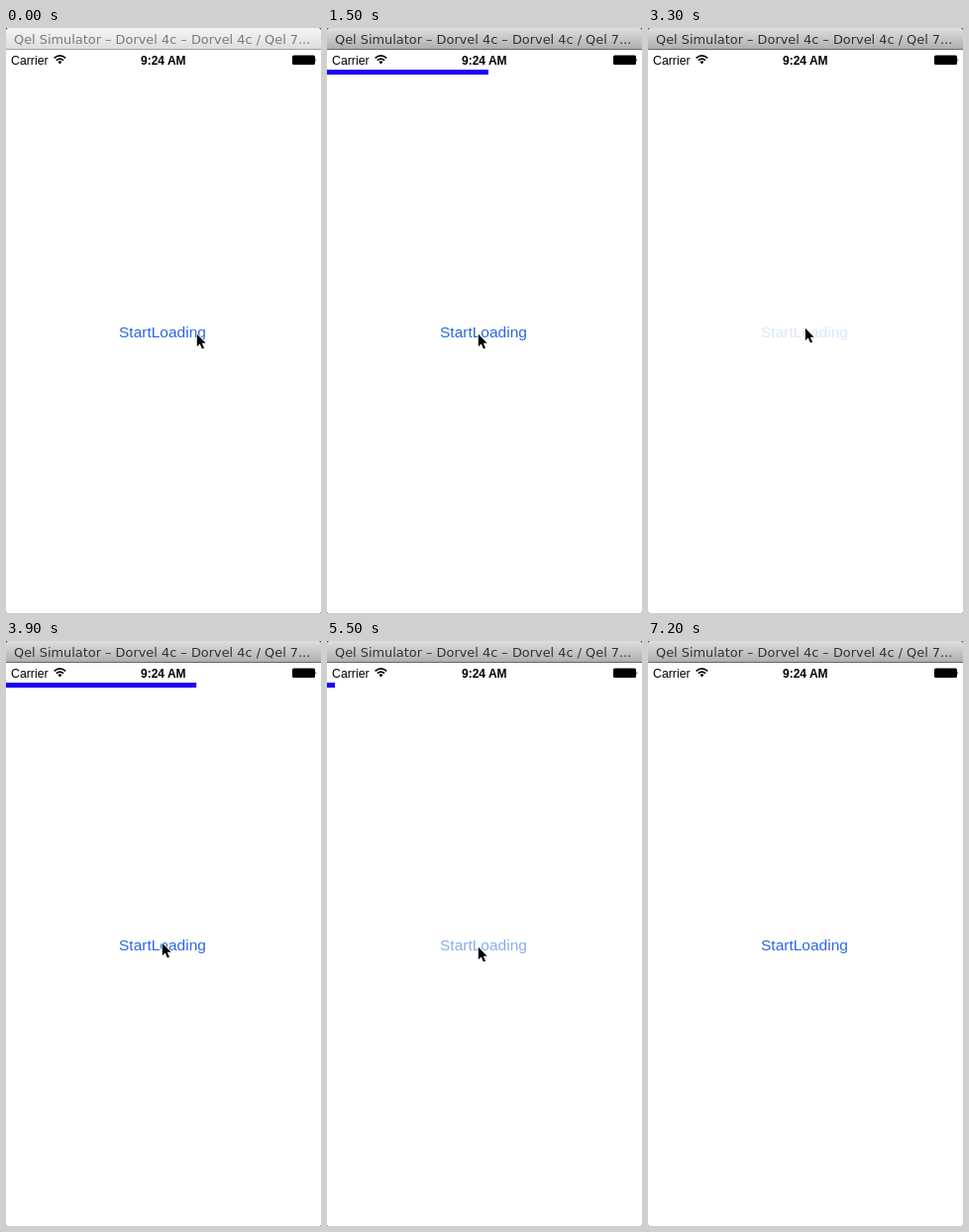
These frames come from a looping animation (318x590 px, 7.6 s). An HTML page:

```html
<!DOCTYPE html>
<html lang="en">
<head>
<meta charset="utf-8">
<title>Loading bar</title>
<style>
  html, body { margin: 0; width: 318px; height: 590px; overflow: hidden; background: #444; }
  svg { display: block; }
  text { font-family: "Liberation Sans", Arial, sans-serif; }
  #title { font-family: "DejaVu Sans", sans-serif; }
</style>
</head>
<body>
<svg width="318" height="590" viewBox="0 0 318 590">
  <defs>
    <linearGradient id="active" x2="0" y2="1">
      <stop stop-color="#dedede"/><stop offset="1" stop-color="#adadad"/>
    </linearGradient>
    <linearGradient id="inactive" x2="0" y2="1">
      <stop stop-color="#f5f5f5"/><stop offset="1" stop-color="#dcdcdc"/>
    </linearGradient>
  </defs>

  <path d="M0 22H318V589L317 590H1L0 589Z" fill="#fff"/>
  <path id="titleBar" d="M0 22V3Q0 0 3 0H315Q318 0 318 3V22Z"/>
  <path id="titleEdge" d="M0 21.5H318"/>
  <text id="title" x="8" y="16" font-size="12.9">Qel Simulator – Dorvel 4c – Dorvel 4c / Qel 7...</text>

  <text x="5" y="36.5" font-size="12.3">Carrier</text>
  <g fill="none" stroke="#000" stroke-width="1.7">
    <path d="M48.6 30.4Q54.4 25.4 60.2 30.4M50.8 32.7Q54.4 29.6 58 32.7"/>
    <path d="M52.4 34L54.4 36.4L56.4 34Q54.4 32.6 52.4 34Z" fill="#000" stroke="none"/>
  </g>
  <text x="136" y="36.5" font-size="12" font-weight="bold">9:24 AM</text>
  <rect x="289" y="27.5" width="23" height="9.5" rx="1.5"/>
  <path d="M312.6 30.5Q314.2 32.2 312.6 34Z"/>

  <rect id="progress" y="42" height="5" fill="#1f00f5"/>
  <text id="button" x="114" y="311.5" font-size="15.5" fill="#2a68e4">StartLoading</text>

  <g id="cursor">
    <path d="M1 1V14L4 11.2L6.2 16.3L8.3 15.4L6.1 10.5H10Z" opacity=".18"/>
    <path d="M.8 .8V13.2L3.7 10.5L5.9 15.6L8 14.7L5.8 9.8H9.6Z" stroke="#fff" stroke-width="1.6" paint-order="stroke"/>
  </g>
</svg>
<script>
const LOOP = 7600, STEP = 100, WIDTH = 318;
const PRESS_TIME = 130, FADE_TIME = 200, PRESSED_OPACITY = 0.16;
const EXIT = 6400, CURSOR_GONE = 6700;

const clicks = [
  { release: 880, load: 1220 },
  { release: 3330, load: 1000 },
  { release: 5407, load: 985 }
];

const el = id => document.getElementById(id);
const clamp = v => Math.min(1, Math.max(0, v));
const phase = (t, from, to) => clamp((t - from) / (to - from));
const easeInOut = u => u * u * (3 - 2 * u);
const glide = (t, from, to) => easeInOut(phase(t, from, to));
const bump = (t, from, to) => Math.sin(Math.PI * phase(t, from, to)) ** 2;

// The pointer rests on the button, dips below it after the second and third click, then leaves.
function pointerAt(t) {
  const arrive = 1 - glide(t, 0, 700);
  const sway = bump(t, 1500, 5100);
  const dip = bump(t, 3900, 4900);
  const sink = glide(t, 5900, EXIT);
  const exit = glide(t, EXIT, EXIT + 200);
  return [
    152 + 40 * arrive + 6 * sway + 23 * dip + 16 * sink + 115 * exit,
    308 - 6 * sway + 94 * dip + 96 * sink - 276 * exit
  ];
}

function buttonOpacity(t) {
  const click = clicks.filter(c => t >= c.release - PRESS_TIME).pop();
  if (!click) return 1;
  return PRESSED_OPACITY + (1 - PRESSED_OPACITY) * phase(t, click.release, click.release + FADE_TIME);
}

function barWidth(t) {
  const run = clicks.find(c => t >= c.release && t <= c.release + c.load);
  return run ? WIDTH * glide(t, run.release, run.release + run.load) : 0;
}

function draw(t) {
  const active = t >= clicks[0].release;
  el("titleBar").setAttribute("fill", active ? "url(#active)" : "url(#inactive)");
  el("titleEdge").setAttribute("stroke", active ? "#686868" : "#a0a0a0");
  el("title").setAttribute("fill", active ? "#333" : "#7c7c7c");
  el("button").setAttribute("opacity", buttonOpacity(t));
  el("progress").setAttribute("width", barWidth(t));
  el("cursor").setAttribute("transform", `translate(${pointerAt(t).map(Math.round)})`);
  el("cursor").setAttribute("visibility", t < CURSOR_GONE ? "visible" : "hidden");
}

const began = performance.now();
function tick() {
  const t = (performance.now() - began) % LOOP;
  draw(Math.floor(t / STEP) * STEP);
  requestAnimationFrame(tick);
}
tick();
</script>
</body>
</html>
```
